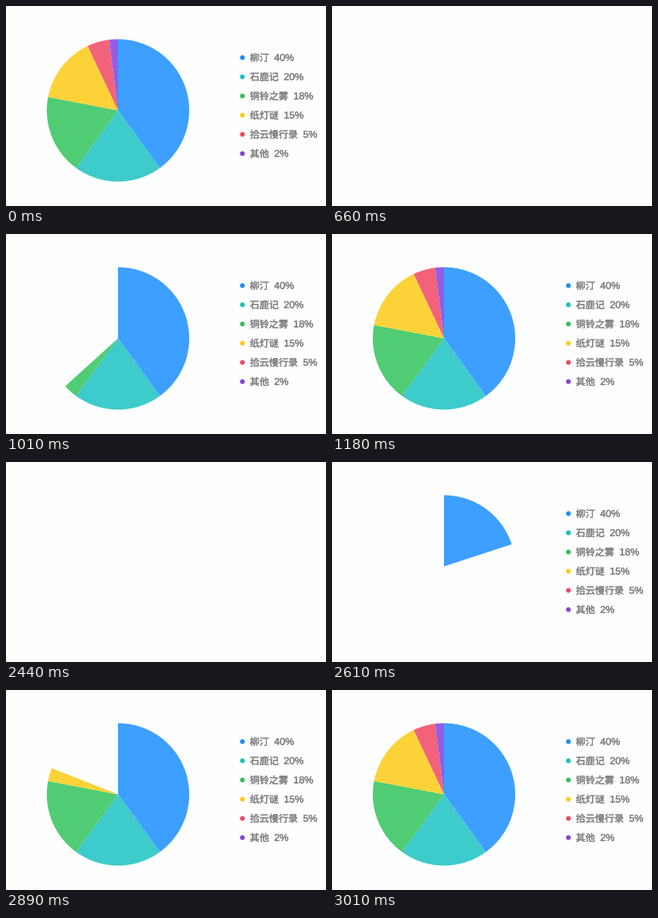
Recreate the animation shown at these times as a matplotlib script. Size 400x250 px, loop 4510 ms.

```python
import matplotlib.pyplot as plt
from matplotlib.animation import FuncAnimation
from matplotlib.patches import Circle, Wedge
from matplotlib.patheffects import withStroke

WIDTH, HEIGHT, DPI = 400, 250, 100
LOOP_MS, INTERVAL = 4510, 10
CENTER, RADIUS = (140, 130.5), 89
SWEEP_MS, TICK = 472, 57.6
TEXT_COLOR = "#808080"

# label, percent, slice colour, legend colour
SLICES = [
    ("柳汀", 40, "#3d9fff", "#1890ff"),
    ("石鹿记", 20, "#3ecbcc", "#13c2c2"),
    ("铜铃之雾", 18, "#50cc74", "#2fc25b"),
    ("纸灯谜", 15, "#fbd338", "#facc14"),
    ("拾云慢行录", 5, "#f2637b", "#f04864"),
    ("其他", 2, "#975ce4", "#8543e0"),
]

# (cleared at, sweep begins, first redraw) in ms
REPLAYS = [(660, 708.8, 719.5), (2440, 2513.3, 2550)]


def sweep_angle(ms):
    """Degrees of pie shown, or None while the chart is cleared."""
    angle = 360
    for cleared, begin, first in REPLAYS:
        if ms < cleared:
            break
        tick = (ms + INTERVAL - 0.01 - first) // TICK
        if tick < 0:
            return None
        angle = min(360, (first + tick * TICK - begin) / SWEEP_MS * 360)
        if angle > 358:
            angle = 360
    return angle


def px(size):
    return size * 72 / DPI


def legend_text(x, y, text, family, size):
    # A thin stroke gives the slightly heavy weight of screen text.
    return ax.text(x, y, text, family=family, fontsize=px(size), color=TEXT_COLOR,
                   va="baseline",
                   path_effects=[withStroke(linewidth=px(0.35), foreground=TEXT_COLOR)])


fig = plt.figure(figsize=(WIDTH / DPI, HEIGHT / DPI), dpi=DPI, facecolor="#fefefe")
ax = fig.add_axes([0, 0, 1, 1])
ax.set(xlim=(0, WIDTH), ylim=(HEIGHT, 0))
ax.axis("off")

wedges, legend = [], []
start = 0
for row, (label, percent, fill, dot) in enumerate(SLICES):
    end = start + percent * 3.6
    wedge = ax.add_patch(Wedge(CENTER, RADIUS, start - 90, end - 90, fc=fill, lw=0))
    wedges.append((wedge, start, end))
    start = end

    y = 64.5 + 24 * row
    legend += [
        ax.add_patch(Circle((295.5, y), 3, fc=dot, lw=0)),
        legend_text(304.8, y + 4.4, label, "Noto Sans CJK JP", 12),
        legend_text(305 + 12 * len(label) + 6.2, y + 4.1, f"{percent}%",
                    "Liberation Sans", 12.4),
    ]


def draw(frame):
    angle = sweep_angle(frame * INTERVAL)
    for artist in legend:
        artist.set_visible(angle is not None)
    for wedge, begin, end in wedges:
        shown = min(end, angle or 0)
        wedge.set_visible(shown > begin)
        if shown > begin:
            wedge.set_theta2(shown - 90)
    return [wedge for wedge, _, _ in wedges] + legend


anim = FuncAnimation(fig, draw, frames=LOOP_MS // INTERVAL, interval=INTERVAL,
                     repeat=True, repeat_delay=0)
plt.show()
```
